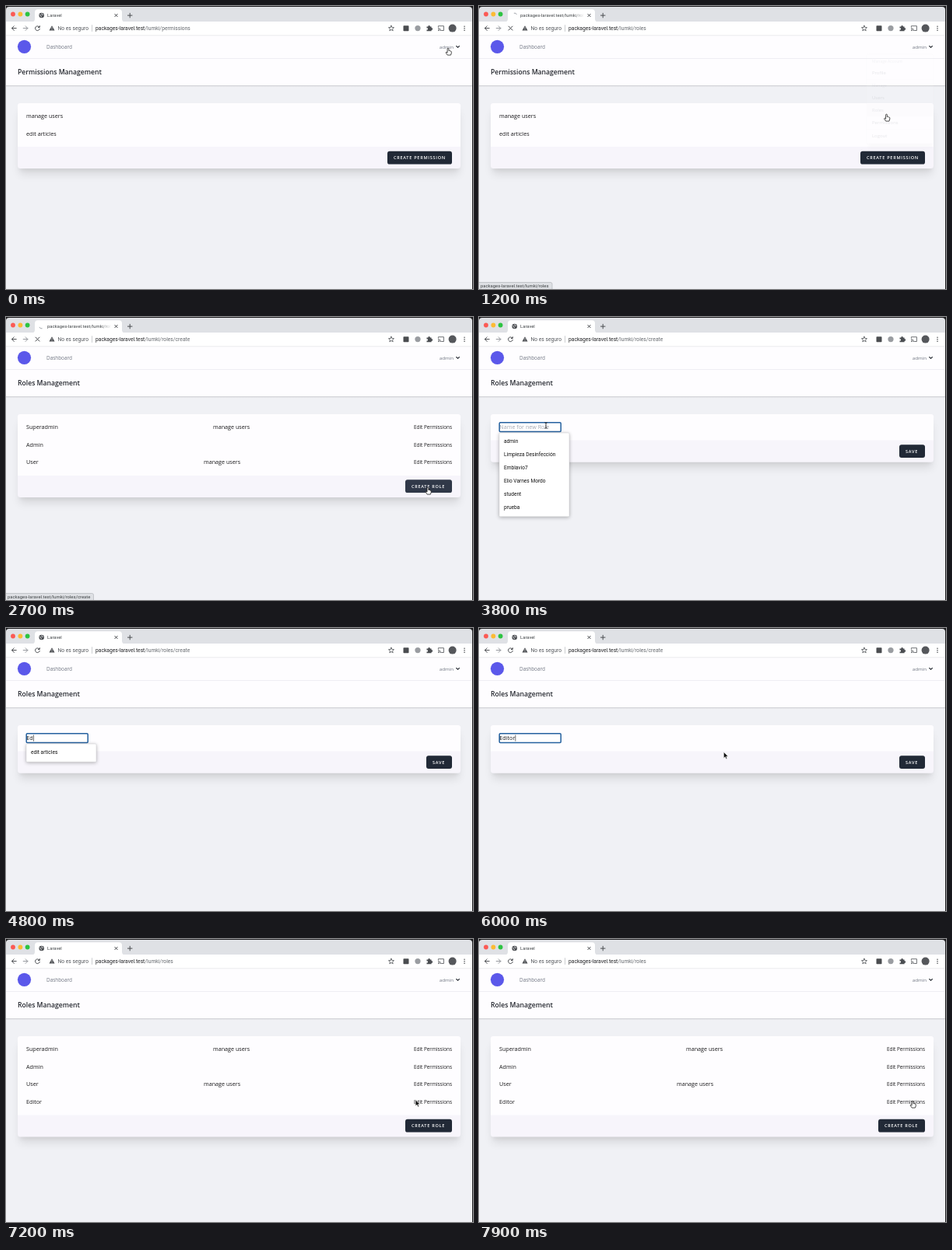
An HTML page that plays this animation: 600x364 px, repeating every 8 s.

```html
<!DOCTYPE html>
<html lang="es">
<head>
<meta charset="utf-8">
<title>Roles</title>
<style>
  html, body { margin: 0; width: 100%; height: 100%; overflow: hidden; background: #1c1c1e; }
  svg { display: block; }
  text { white-space: pre; }
  .ui { font-family: Roboto, sans-serif; }
  .app { font-family: "Open Sans", sans-serif; }
  .row { font-size: 7.2px; fill: #1a1a1c; }
  .small { font-size: 6.38px; fill: #1a1a1c; }
  .head { font-size: 8.65px; font-weight: 600; fill: #25282f; }
  .btn { font-size: 5.6px; font-weight: 600; letter-spacing: .7px; fill: #fff; }
  .tab { font-size: 5.9px; fill: #3c4043; }
  .url { font-size: 6.72px; fill: #202124; }
  .pop { font-size: 6.6px; fill: #111; }
  .line { fill: none; stroke: #4a4d51; stroke-width: 1; stroke-linecap: round; stroke-linejoin: round; }
  .blur6 { filter: blur(6px); }
  .blur2 { filter: blur(2.4px); }
</style>
</head>
<body>
<svg id="stage" width="600" height="364" viewBox="0 0 600 364">
  <defs>
    <linearGradient id="fade"><stop stop-color="#fff" stop-opacity="0"/><stop offset="1" stop-color="#fff"/></linearGradient>
    <linearGradient id="edge" x2="0" y2="1"><stop stop-color="#000" stop-opacity=".16"/><stop offset="1" stop-color="#000" stop-opacity="0"/></linearGradient>
  </defs>

  <!-- window and page background -->
  <path d="M0 364V5Q0 1 4 1H595Q599 1 599 5V364Z" fill="#dfe1e5"/>
  <rect y="38" width="599" height="326" fill="#f0f1f5"/>
  <rect y="38" width="599" height="64" fill="#fefdff"/>
  <rect y="102" width="599" height="2" fill="url(#edge)"/>
  <rect y="67" width="599" height=".7" fill="#e9e9ee"/>

  <g class="app">
    <circle cx="23.5" cy="52.3" r="8.6" fill="#5b58ea"/>
    <text class="small" x="52" y="55" style="fill:#6f7581">Dashboard</text>
    <text x="575" y="55" text-anchor="end" font-size="6.15" fill="#6f7581">admin</text>
    <path class="line" d="M578.6 51.5l1.9 1.9 1.9-1.9" style="stroke:#30343b;stroke-width:1.1"/>
    <text class="head" id="heading" x="15" y="88.2"></text>
    <g id="page"></g>
    <g id="menu"></g>
  </g>

  <!-- browser frame -->
  <g class="ui">
    <circle cx="9" cy="10.5" r="2.9" fill="#fb5a54"/>
    <circle cx="18.4" cy="10.5" r="2.9" fill="#fcbb34"/>
    <circle cx="27.6" cy="10.5" r="2.9" fill="#2cc441"/>
    <path d="M33 20.5Q37 20.5 37 16.5V8Q37 4.2 41 4.2H145Q149 4.2 149 8V16.5Q149 20.5 153 20.5Z" fill="#fff"/>
    <rect y="20" width="599" height="18" fill="#fff"/>
    <rect y="37.6" width="599" height=".6" fill="#dcdde0"/>
    <g id="globe"><circle cx="45.7" cy="12" r="3.3" fill="#4a4d51"/>
      <path d="M43.3 11.2l1.7 1.2.3 1.8M46.3 9.3l-.6 1.3 1.7.8.9-.6" fill="none" stroke="#fff" stroke-width=".8"/></g>
    <path id="spinner" d="M42.8 12A2.9 2.9 0 0 1 45.7 9.1" fill="none" stroke="#a4a8ae" stroke-width=".9"/>
    <text class="tab" id="title" x="53" y="14.2"></text>
    <rect x="122" y="6" width="13" height="12" fill="url(#fade)"/>
    <rect x="135" y="6" width="12" height="12" fill="#fff"/>
    <path class="line" d="M139.8 10.3l3.4 3.4m0-3.4l-3.4 3.4M159.2 9.3v5.6m-2.8-2.8h5.6"/>
    <path class="line" d="M13.2 28.6H7.6m2.7-2.8L7.5 28.6l2.8 2.8"/>
    <path class="line" d="M22.2 28.6h5.6m-2.7-2.8l2.8 2.8-2.8 2.8" style="stroke:#93979c"/>
    <path class="line" id="reload" d="M42.8 27A2.9 2.9 0 1 0 43.3 29.4M43.3 25.6v1.9h-1.9"/>
    <path class="line" id="stop" d="M38 26.1l5 5m0-5l-5 5"/>
    <path d="M59 25.3l3.5 6.2h-7z" fill="#4a4d51"/>
    <path d="M59 27.4v2m0 .7v.7" stroke="#fff" stroke-width=".7"/>
    <text class="url" x="66.5" y="30.9" style="fill:#55585d">No es seguro</text>
    <rect x="110.3" y="24.3" width=".7" height="8.6" fill="#b5b8bc"/>
    <text class="url" x="115" y="30.9">packages-laravel.test<tspan id="path" fill="#65696e"></tspan></text>
    <path class="line" d="M495 25.2l1 2.3 2.5.2-1.9 1.7.6 2.4-2.2-1.3-2.2 1.3.6-2.4-1.9-1.7 2.5-.2z" style="stroke-width:.8"/>
    <rect x="510.5" y="25.2" width="7" height="7" rx=".8" fill="#4b4d50"/>
    <circle cx="529" cy="28.6" r="3.6" fill="#9a9da1"/>
    <path d="M540.5 26.6h2a1.2 1.2 0 1 1 2.2 0h1.9v1.8a1.2 1.2 0 1 1 0 2.3v1.6h-6.1v-1.9a1.1 1.1 0 1 0 0-2z" fill="#4a4d51"/>
    <path class="line" d="M555.4 27v-1.3h7v5.8h-2.8M555.4 31.6h.2m-.2-1.6q1.6 0 1.6 1.6m-1.6-3.2q3.2 0 3.2 3.2" style="stroke-width:.8"/>
    <circle cx="573.6" cy="28.6" r="5" fill="#55575b"/>
    <g fill="#4a4d51"><circle cx="589" cy="26.2" r=".8"/><circle cx="589" cy="28.7" r=".8"/><circle cx="589" cy="31.2" r=".8"/></g>
    <g id="status"></g>
  </g>

  <g id="cursor">
    <path id="hand" d="M-.9.7Q-.9-.3 0-.3 .9-.3 .9.7V3Q1.7 2.5 2.1 3.2 3 2.9 3.3 3.7 4.3 3.5 4.3 4.7L4.2 6.5 3.4 8.6H-.8L-2.8 5.7Q-2.9 4.5-1.9 4.8L-.9 5.7Z" fill="#fff" stroke="#111" stroke-width=".75"/>
    <path id="arrow" d="M0 0V8L1.9 6.3 3.2 9.1 4.5 8.5 3.3 5.8H5.8Z" fill="#111" stroke="#fff" stroke-width=".6"/>
    <path id="beam" d="M-1.7-3.8Q0-3.8 0-2.8 0-3.8 1.7-3.8M0-3V3M-1.7 3.8Q0 3.8 0 2.8 0 3.8 1.7 3.8" fill="none" stroke="#111" stroke-width=".8"/>
  </g>
</svg>

<script>
const LOOP = 8000;
const $ = id => document.getElementById(id);
const HOST = 'packages-laravel.test', ROLES = '/lumki/roles', CREATE = ROLES + '/create';

// [start time, value]: each value holds until the next step
const steps = {
  page: [[0, 'perms'], [1400, 'roles'], [2800, 'create'], [7000, 'more']],
  path: [[0, '/lumki/permissions'], [1120, ROLES], [2600, CREATE], [6650, ROLES]],
  load: [[0, 0], [1120, 1], [1600, 0], [2600, 1], [2900, 0], [6650, 1], [7200, 0]],
  title: [[0, 'Laravel'], [1120, HOST + ROLES], [1600, 'Laravel'], [2600, HOST + CREATE],
    [2900, 'Laravel'], [7000, HOST + ROLES], [7200, 'Laravel']],
  status: [[0, ''], [1100, HOST + ROLES], [1400, ''], [2250, HOST + CREATE], [2800, ''],
    [6700, `Esperando a ${HOST}...`], [7000, '']],
  typed: [[0, ''], [4600, 'E'], [4750, 'Ed'], [4900, 'Edi'], [5000, 'Edit'], [5200, 'Edito'], [5300, 'Editor']],
  focus: [[0, 0], [3750, 1], [6600, 0]],
  hover: [[0, 0], [2250, 1], [2800, 0], [6300, 1], [6600, 2], [7000, 0]],
  cursor: [[0, 'hand'], [1400, 'arrow'], [2250, 'hand'], [2750, 'arrow'], [3450, 'beam'], [4600, ''],
    [5650, 'beam'], [5850, 'arrow'], [6300, 'hand'], [7050, 'arrow'], [7650, 'hand']]
};
// time, x, y
const moves = [[0, 568, 54.5], [200, 568, 54.5], [900, 523.5, 139.5], [1500, 523.5, 139.5], [2400, 542, 219.5],
  [2700, 542, 219.5], [2800, 362, 207], [3600, 86, 139.5], [5600, 86, 139.5], [6400, 541, 179.3],
  [7000, 541, 179.3], [7400, 511.5, 234], [7700, 565, 210], [7900, 557, 208.5]];

const saved = ['admin', 'Limpieza Desinfección', 'Emblavio7', 'Elio Varnes Mordo', 'student', 'prueba'];
const clamp = v => Math.max(0, Math.min(1, v));
const at = (name, t) => steps[name].findLast(s => s[0] <= t)[1];

function pointer(t) {
  const i = moves.findLastIndex(m => m[0] <= t), a = moves[i], b = moves[i + 1] || a;
  const k = clamp((t - a[0]) / (b[0] - a[0] || 1)), e = k * k * (3 - 2 * k);
  return [a[1] + (b[1] - a[1]) * e, a[2] + (b[2] - a[2]) * e];
}

const cache = {};
function put(id, html) {
  if (cache[id] !== html) $(id).innerHTML = cache[id] = html;
}
const show = (id, on) => $(id).style.display = on ? '' : 'none';
const text = (cls, x, y, s, more = '') => `<text class="${cls}" x="${x}" y="${y}" ${more}>${s}</text>`;
const rect = (x, y, w, h, more) => `<rect x="${x}" y="${y}" width="${w}" height="${h}" ${more}/>`;

function card(split, bottom) {
  const h = bottom - 125;
  return rect(17.4, 137, 564.2, h - 4.8, 'class="blur6" fill="#000" opacity=".1"') +
    rect(17.4, 132, 564.2, h - 4.8, 'class="blur2" fill="#000" opacity=".05"') +
    rect(15, 125, 569, h, 'rx="3.5" fill="#f7f5fb"') +
    `<path d="M15 ${split}V128.5Q15 125 18.5 125H580.5Q584 125 584 128.5V${split}Z" fill="#fefdff"/>`;
}

function button(x, y, label, hover) {
  const ring = hover > 1 ? rect(x - .8, y - .8, 574.6 - x, 18.4, 'rx="3.6" fill="#c3c4dc"') : '';
  return ring + rect(x, y, 573 - x, 16.8, `rx="2.9" fill="${hover ? '#303848' : '#212936'}"`) +
    text('btn', x + 8, y + 10.4, label);
}

function rolesPage(names, hover) {
  const end = 136.5 + names.length * 22.5;
  return card(end, end + 28) + names.map((name, i) => {
    const y = 144 + i * 22.5, x = [266, 0, 254][i];
    return text('row', 26, y, name) + (x ? text('row', x, y, 'manage users') : '') +
      text('small', 573, y + .2, 'Edit Permissions', 'text-anchor="end"');
  }).join('') + button(513, end + 5.3, 'CREATE ROLE', hover);
}

function popup(typed) {
  const pool = typed ? [saved[2], 'edit articles'] : saved;
  const list = pool.filter(s => s.toLowerCase().startsWith(typed.toLowerCase()));
  if (!list.length) return '';
  const h = list.length * 16.9 + 6.4;
  return rect(26, 150, 90, h, 'class="blur2" fill="#000" opacity=".3"') +
    rect(26, 149, 90, h, 'rx="1" fill="#fff" stroke="#c9cacd" stroke-width=".5"') +
    list.map((s, i) => text('pop ui', 32, 162.3 + i * 16.9, s)).join('');
}

function createPage(typed, focus, hover) {
  const ring = rect(26.2, 135.8, 79, 11.6, 'rx="1.2" fill="#fff" stroke="#24619f" stroke-width="1.5"');
  const caret = rect(26.6 + [0, 4, 8.4, 10.2, 12.8, 17.1, 20][typed.length], 137.6, .6, 8, 'fill="#111"');
  return card(158.6, 186.8) + button(540, 164.2, 'SAVE', hover) + (focus ? ring : '') +
    text('row', 26.3, 144, typed || 'Name for new Role', typed ? '' : 'style="fill:#a3a8b2"') +
    (focus ? (typed ? caret : '') + popup(typed) : '');
}

const builders = {
  perms: () => card(181, 209) + text('row', 26, 144, 'manage users') + text('row', 26, 166.5, 'edit articles') +
    button(490, 186.8, 'CREATE PERMISSION', 0),
  roles: s => rolesPage(['Superadmin', 'Admin', 'User'], s.hover),
  more: () => rolesPage(['Superadmin', 'Admin', 'User', 'Editor'], 0),
  create: s => createPage(s.typed, s.focus, s.hover)
};

// label, centre below the menu top, is a group caption
const items = [['Manage Account', 9.4, 1], ['Profile', 25.4], ['Manage', 42, 1], ['Users', 58.6],
  ['Roles', 75.5], ['Permissions', 92.4], ['Logout', 109.8]];

function drawMenu(t, y) {
  const open = t < 1100 ? 1 - (1 - clamp((t - 100) / 200)) ** 2 : 1 - clamp((t - 1100) / 114);
  const menu = $('menu'), k = .95 + .05 * open;
  show('menu', open > 0);
  menu.setAttribute('opacity', open);
  menu.setAttribute('transform', `translate(584 62) scale(${k}) translate(-584 -62)`);
  put('menu', rect(496, 68, 86, 121, 'class="blur2" fill="#000" opacity=".14"') +
    rect(493.7, 62, 90.3, 120.5, 'rx="2.8" fill="#fff" stroke="#e4e5e9" stroke-width=".5"') +
    rect(493.7, 95.8, 90.3, .5, 'fill="#eff0f3"') + rect(493.7, 163, 90.3, .5, 'fill="#eff0f3"') +
    items.map(([label, dy, caption]) => {
      const mid = 62 + dy, lit = !caption && Math.abs(y - mid) < 8.4;
      return (lit ? rect(493.9, mid - 8.4, 89.9, 16.8, 'fill="#f1f2f5"') : '') +
        text('', 501.3, mid + 2.2, label, caption ? 'font-size="5.3" fill="#9ca3af"' : 'font-size="6.25" fill="#374151"');
    }).join(''));
}

function drawStatus(s) {
  const w = s.startsWith('E') ? 199 : s.endsWith('create') ? 112.5 : 94;
  put('status', s && `<path d="M-1 365V355.5H${w - 2}Q${w} 355.5 ${w} 357.5V365Z" fill="#dee0e4" stroke="#b4b6ba" stroke-width=".7"/>` +
    text('tab', 2, 362.1, s));
}

function draw(t) {
  const s = {};
  for (const name in steps) s[name] = at(name, t);
  const [x, y] = pointer(t);

  put('heading', s.page === 'perms' ? 'Permissions Management' : 'Roles Management');
  put('page', builders[s.page](s));
  put('path', s.path);
  put('title', s.title.slice(0, 31));
  drawStatus(s.status);
  drawMenu(t, y);

  show('globe', !s.load);
  show('reload', !s.load);
  show('spinner', s.load);
  show('stop', s.load);
  $('spinner').setAttribute('transform', `rotate(${t * .36 % 360} 45.7 12)`);

  for (const kind of ['hand', 'arrow', 'beam']) show(kind, s.cursor === kind);
  $('cursor').setAttribute('transform', `translate(${x} ${y})`);
}

const start = performance.now();
function tick() {
  draw((performance.now() - start) % LOOP);
  requestAnimationFrame(tick);
}
tick();
</script>
</body>
</html>
```
